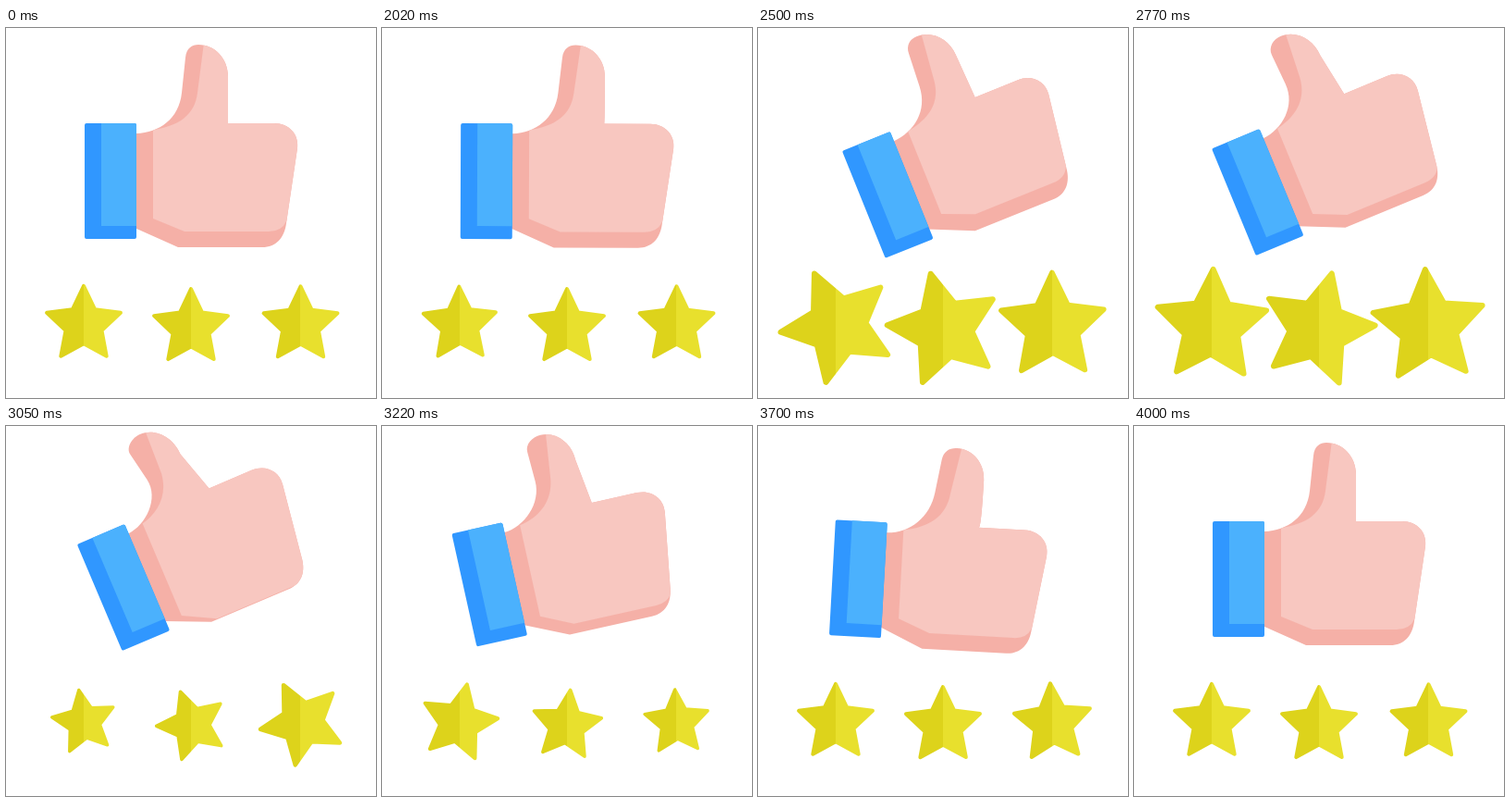
These frames come from a looping animation (400 by 400 pixels, 4020 ms). An HTML page with a canvas:

```html
<!DOCTYPE html>
<html>
<head>
<meta charset="utf-8">
<style>
html, body { margin: 0; width: 100%; height: 100%; overflow: hidden; background: #fff; }
canvas { display: block; }
</style>
</head>
<body>
<canvas id="stage" width="400" height="400"></canvas>
<script>
const ctx = document.getElementById('stage').getContext('2d');
const LOOP = 4020, REST = 2000, STAR_LAG = 0.065;
const RAD = Math.PI / 180;

// Turning points: time in seconds, then the values reached
const handMoves = [ // centre x, centre y, angle, thumb fold, thumb lean
  [0, 200, 170, 0, 0, 0],
  [0.27, 196.6, 196.5, 12, 1, 0],
  [0.5, 222.6, 152, -22, 0, 0.15],
  [1.05, 208.8, 144.7, -23, 0, 1],
  [1.47, 190.5, 178.6, 6, 0.15, 0],
  [1.95, 200, 170, 0, 0, 0]
];
const starTurns = [
  [0, 0], [0.1, -9], [0.25, 14], [0.55, -27], [0.72, 15],
  [0.86, -29], [1.26, 13], [1.5, -7], [1.65, 0]
];
const starScales = [
  [0, 1], [0.09, 0.85], [0.46, 1.48], [0.75, 1.48], [1.05, 0.84], [1.37, 1.14], [1.65, 1]
];

// Thumb joints: base, side, top, front
const upright = [[190, 70], [194, 32], [208, 18], [240, 52]];
const folded = [[198, 70], [220, 58], [256, 50], [274, 70]];
const leaned = [[182, 68], [176, 36], [194, 20], [226, 57]];

// Ease in and out between neighbouring turning points
function pose(keys, t) {
  const i = keys.findIndex(k => k[0] > t);
  if (i < 1) return keys.at(i).slice(1);
  const a = keys[i - 1], b = keys[i];
  const u = (t - a[0]) / (b[0] - a[0]), e = u * u * (3 - 2 * u);
  return a.map((v, j) => v + (b[j] - v) * e).slice(1);
}

function thumbJoints(fold, lean) {
  const lift = 28 * fold * (1 - fold);
  return upright.map((joint, i) => joint.map((v, axis) =>
    v + fold * (folded[i][axis] - v) + lean * (leaned[i][axis] - v) - axis * lift));
}

function skinPath([[bx, by], [cx, cy], [dx, dy], [ex, ey]]) {
  const skin = new Path2D();
  skin.moveTo(139, 114);
  skin.lineTo(141, 114);
  skin.bezierCurveTo((141 + bx) / 2, 113, bx - 0.75 * (cx - bx), by - 0.75 * (cy - by), bx, by);
  skin.lineTo(cx, cy);
  skin.bezierCurveTo(cx + 0.27 * (cx - bx), cy + 0.27 * (cy - by), (cx + dx) / 2, dy, dx, dy);
  skin.bezierCurveTo(dx + 0.56 * (ex - dx), dy, ex, ey - 0.55 * (ey - dy), ex, ey);
  skin.quadraticCurveTo(Math.max(ex, 240), 103, 240, 103);
  skin.lineTo(290, 103);
  skin.bezierCurveTo(306, 103, 317, 115, 315, 130);
  skin.lineTo(303, 211);
  skin.bezierCurveTo(301, 227, 292, 237, 277, 237);
  skin.lineTo(186, 237);
  skin.lineTo(139, 216);
  skin.closePath();
  return skin;
}

// Overlaps the outline on the right, so it is drawn clipped to the skin
function highlightPath([[bx, by], , [dx, dy]], fold, drop) {
  const light = new Path2D(), x = bx + 17 * (1 - 2 * fold * fold);
  light.moveTo(dx + 7, dy - 10);
  light.lineTo(x, by);
  light.bezierCurveTo(x - 3, by + 25, x - 21, 106, 159, 110);
  light.lineTo(159, 206 + 0.75 * drop);
  light.lineTo(193, 220 + drop);
  light.lineTo(284, 220 + drop);
  light.quadraticCurveTo(298, 220 + drop, 303, 209 + drop);
  light.lineTo(330, 200 + drop);
  light.lineTo(330, 0);
  return light;
}

function fillBox(color, x, y, w, h, r) {
  ctx.fillStyle = color;
  ctx.beginPath();
  ctx.roundRect(x, y, w, h, r);
  ctx.fill();
}

function drawHand(t) {
  const [x, y, angle, fold, lean] = pose(handMoves, t);
  const joints = thumbJoints(fold, lean), skin = skinPath(joints);
  ctx.save();
  ctx.translate(x, y);
  ctx.rotate(angle * RAD);
  ctx.translate(-200, -170);
  ctx.fillStyle = '#f5b0a7';
  ctx.fill(skin);

  ctx.save();
  ctx.clip(skin);
  ctx.fillStyle = '#f8c7c0';
  ctx.fill(highlightPath(joints, fold, 16 * lean * lean));
  ctx.restore();

  fillBox('#3097ff', 85, 103, 56, 125, 2);
  fillBox('#4bb1fd', 103, 103, 38, 111, [0, 2, 0, 0]);
  ctx.restore();
}

// The star turns about the middle of its box; its shaded half stays upright
function drawStar(x, y, t) {
  const [angle] = pose(starTurns, t), [scale] = pose(starScales, t);
  const sin = Math.sin(angle * RAD), cos = Math.cos(angle * RAD);
  const cx = x - 3.8 * scale * sin, cy = y + 3.8 * scale * cos;
  const paint = ctx.createLinearGradient(x - 1, 0, x + 1, 0);
  paint.addColorStop(0.5, '#ddd31b');
  paint.addColorStop(0.5, '#e8e02d');
  ctx.beginPath();
  for (let i = 0; i < 10; i++) {
    const r = scale * (i % 2 ? 20.5 : 42), a = (angle + i * 36) * RAD;
    ctx.lineTo(cx + r * Math.sin(a), cy - r * Math.cos(a));
  }
  ctx.closePath();
  ctx.fillStyle = ctx.strokeStyle = paint;
  ctx.lineWidth = 4 * scale;
  ctx.lineJoin = 'round';
  ctx.fill();
  ctx.stroke();
}

function draw(now) {
  const t = (now % LOOP - REST) / 1000;
  ctx.fillStyle = '#fff';
  ctx.fillRect(0, 0, 400, 400);
  drawHand(t);
  [[84, 317], [200, 320.3], [318.5, 317.5]].forEach(([x, y], i) =>
    drawStar(x, y, t - i * STAR_LAG));
}

const start = performance.now();
function tick() {
  draw(performance.now() - start);
  requestAnimationFrame(tick);
}
tick();
</script>
</body>
</html>
```
